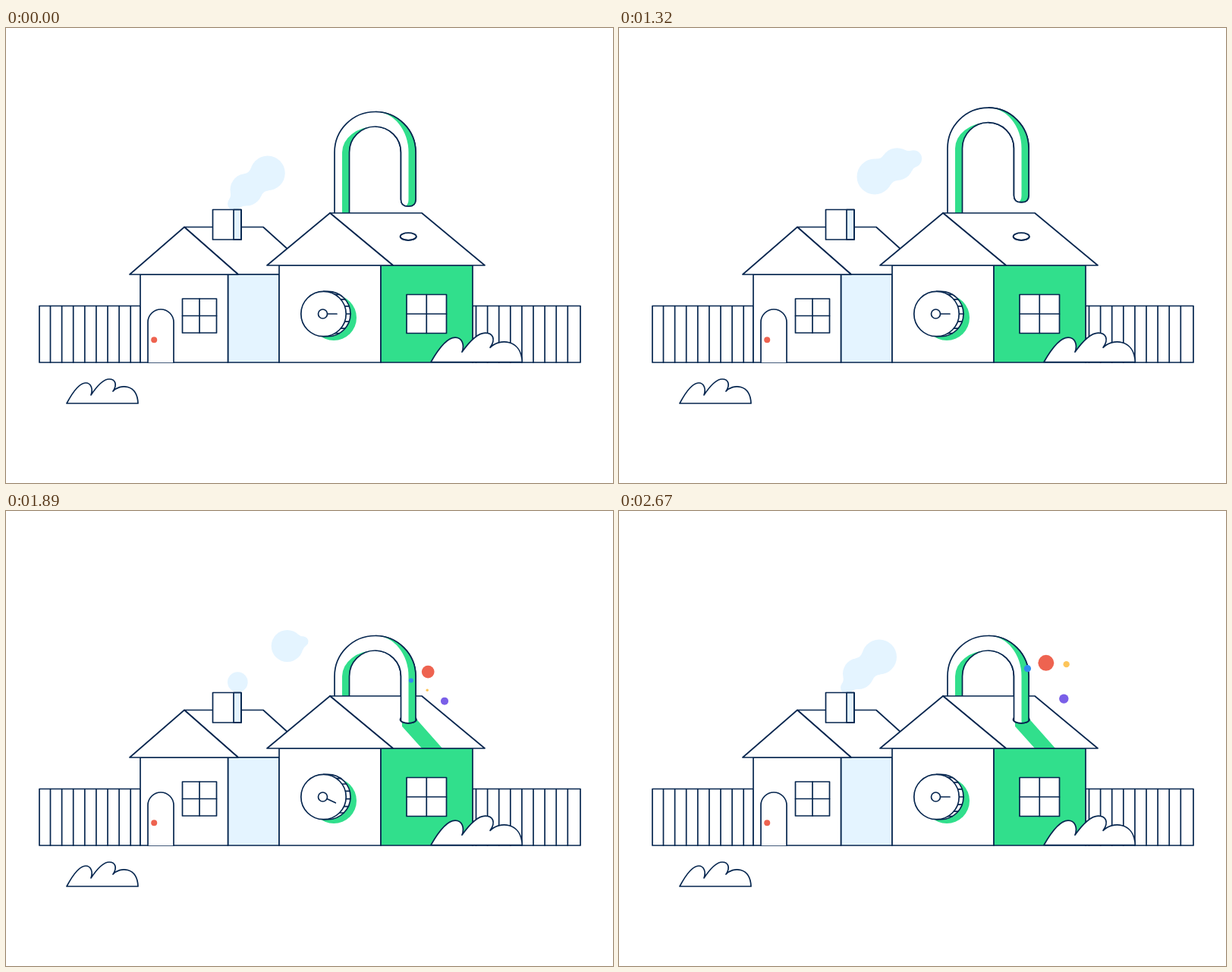
Write an HTML page with a canvas that moves like this. It is 800 by 600 pixels and loops after 2.7 s.

```html
<!DOCTYPE html>
<html lang="en">
<head>
<meta charset="utf-8">
<title>Locked house</title>
<style>
  html, body { margin: 0; width: 100%; height: 100%; overflow: hidden; background: #fff; }
  canvas { display: block; }
</style>
</head>
<body>
<canvas id="stage" width="800" height="600"></canvas>
<script>
const ctx = document.getElementById('stage').getContext('2d');
const LOOP = 2700, STEP = 30, TAU = Math.PI * 2;
const NAVY = '#06264f', GREEN = '#31df8c', PALE = '#e4f4ff', RED = '#ee6350', WHITE = '#fff';

const clamp = v => Math.max(0, Math.min(1, v));
const progress = (t, from, to) => clamp((t - from) / (to - from));
const easeSine = p => (1 - Math.cos(Math.PI * p)) / 2;
const easeCubic = p => p < 0.5 ? 4 * p ** 3 : 1 - 4 * (1 - p) ** 3;
const mix = (a, b, p) => a + (b - a) * p;

function paint(path, fill, stroke = NAVY) {
  if (fill) { ctx.fillStyle = fill; ctx.fill(path); }
  if (stroke) { ctx.strokeStyle = stroke; ctx.stroke(path); }
}
const shape = (d, fill, stroke) => paint(new Path2D(d), fill, stroke);
const box = (x, y, x2, y2, fill, stroke) => shape(`M${x} ${y}H${x2}V${y2}H${x}Z`, fill, stroke);

function disc(x, y, r, fill, stroke = null, ry = r) {
  const path = new Path2D();
  path.ellipse(x, y, Math.max(0, r), Math.max(0, ry), 0, 0, TAU);
  paint(path, fill, stroke);
}

// ---- Smoke: puffs follow one path by age and melt together where they touch ----
const PUFF_BIRTHS = [410, 1650, 2160, 2610];
const PUFF_PATH = [ // age, x, y, radius
  [0, 298, 237, 5], [60, 300, 233, 8], [330, 308, 222, 16], [570, 318, 212, 22],
  [910, 337, 196, 23.5], [1020, 343, 192.5, 23], [1300, 360, 182, 22],
  [1570, 376, 176, 20.5], [1810, 386.5, 172.5, 12.5], [1950, 391, 172, 8.5], [2080, 395, 172, 0]
];

function puffAt(age) {
  const i = PUFF_PATH.findIndex(p => p[0] > age);
  if (i < 1) return null;
  const a = PUFF_PATH[i - 1], b = PUFF_PATH[i], p = progress(age, a[0], b[0]);
  return { x: mix(a[1], b[1], p), y: mix(a[2], b[2], p), r: mix(a[3], b[3], p) };
}

function neck(a, b, f) {
  const dx = b.x - a.x, dy = b.y - a.y, d = Math.hypot(dx, dy);
  if (d <= Math.abs(a.r - b.r) || d > a.r + b.r + 4) return;
  const ra = a.r + f, rb = b.r + f;
  const along = (ra * ra - rb * rb + d * d) / (2 * d);
  const h = Math.sqrt(Math.max(0, ra * ra - along * along));
  if (h <= f) return;
  const ux = dx / d, uy = dy / d;
  const side = s => ({ x: a.x + ux * along - uy * h * s, y: a.y + uy * along + ux * h * s });
  const angle = (from, to) => Math.atan2(to.y - from.y, to.x - from.x);
  const p = side(1), q = side(-1);
  ctx.beginPath();
  ctx.arc(p.x, p.y, f, angle(p, a), angle(p, b), false);
  ctx.arc(q.x, q.y, f, angle(q, b), angle(q, a), false);
  ctx.closePath();
  ctx.fillStyle = PALE;
  ctx.fill();
}

function drawSmoke(t) {
  const puffs = PUFF_BIRTHS
    .map(birth => (t - birth + LOOP) % LOOP)
    .sort((a, b) => a - b)
    .map(puffAt)
    .filter(Boolean);
  puffs.forEach((p, i) => {
    disc(p.x, p.y, p.r, PALE);
    if (i) neck(puffs[i - 1], p, 12);
  });
}

// ---- Scenery ----
function drawFence(left, right, first, count) {
  box(left, 366.5, right, 441, WHITE);
  for (let i = 0; i < count; i++) shape(`M${first + i * 15.1} 366.5V441`);
}

function drawWindow(x, y, x2, y2) {
  box(x, y, x2, y2, WHITE);
  shape(`M${(x + x2) / 2} ${y}V${y2}M${x} ${(y + y2) / 2}H${x2}`);
}

function drawBush(x, y, sx, sy) {
  const outline = new Path2D('M0 0C8-15 17-27 25-27C32-27 35-19 32-11C40-23 49-32 56-32' +
    'C64-32 67-25 61-16C70-26 93-26 94 0Z');
  const placed = new Path2D();
  placed.addPath(outline, new DOMMatrix([sx, 0, 0, sy, x, y]));
  paint(placed, WHITE);
}

function drawSmallHouse() {
  shape('M235 262.5H339L395 313V325H306Z', WHITE);
  box(292.5, 325, 360, 441, PALE);
  box(177, 325, 292.5, 441, WHITE);
  shape('M163 325L235 262.5L306 325Z', WHITE);
  box(272.5, 239.5, 310, 279, WHITE, null);
  box(300, 239.5, 310, 279, PALE);
  box(272.5, 239.5, 310, 279);
  shape('M187 441V388A17 17 0 0 1 221 388V441', WHITE);
  disc(195.2, 411.3, 4, RED);
  drawWindow(232.5, 357, 277.5, 402);
}

function drawDial(turn) {
  const x = 418.5, y = 377, r = 29.7, depth = 5.8, gap = Math.PI / 9;
  disc(432, 382, 30, GREEN);
  shape(`M${x} ${y - r}H${x + depth}A${r} ${r} 0 0 1 ${x + depth} ${y + r}H${x}Z`, WHITE);
  for (let k = -3; k <= 3; k++) {
    const a = k * gap + turn % gap;
    if (Math.abs(a) > 1.1) continue;
    shape(`M${x + r * Math.cos(a)} ${y + r * Math.sin(a)}h${depth}`);
  }
  disc(x, y, r, WHITE, NAVY);
  const hx = 417.5, c = Math.cos(turn), s = Math.sin(turn);
  shape(`M${hx + 6 * c} ${y + 6 * s}L${hx + 18.5 * c} ${y + 18.5 * s}`);
  disc(hx, y, 6, WHITE, NAVY);
}

// ---- Shackle ----
const HOLE = { x: 530.2, y: 275, rx: 10.6, ry: 4.8 };

function drawShackle(drop) {
  ctx.save();
  ctx.translate(0, drop);
  const outline = 'M433 300V164A53.5 53.5 0 0 1 540 164V226Q540 235 531 235H529.5' +
    'Q520.5 235 520.5 226V164A34 34 0 0 0 452.5 164V300';
  shape(outline, WHITE, null);
  shape('M443 300V164A43.5 34 0 0 1 486.5 130A34 34 0 0 0 452.5 164V300Z', GREEN, null);
  shape('M486.5 110.5A53.5 53.5 0 0 1 540 164V226Q540 235 531 235H527Q530.5 232 530.5 226V164' +
    'A44 53.5 0 0 0 486.5 110.5Z', GREEN, null);
  shape(outline);
  ctx.restore();
}

function drawRoofShadow(drop) {
  const away = Math.max(0, 1 - drop / 54);
  ctx.save();
  ctx.clip(new Path2D('M427 244H548L631 313H510Z'));
  ctx.translate(36 * away, 40 * away);
  shape('M522 276V284L557 323H584L541 274.5Z', GREEN, null);
  ctx.restore();
}

function drawRightLeg(drop) {
  ctx.save();
  const { x, y, rx, ry } = HOLE;
  ctx.clip(new Path2D(`M487 0H600V${y}H${x + rx}A${rx} ${ry} 0 0 1 ${x - rx} ${y}H487Z`));
  drawShackle(drop);
  ctx.restore();
  shape(`M${x + rx} ${y}A${rx} ${ry} 0 0 1 ${x - rx} ${y}`);
}

function drawBigHouse(drop, turn) {
  box(360, 313, 494, 441, WHITE);
  box(494, 313, 615, 441, GREEN);
  shape('M427 244H548L631 313H510Z', WHITE, null);
  drawRoofShadow(drop);
  shape('M427 244H548L631 313H510Z');
  shape('M344 313L427 244L510 313Z', WHITE);
  disc(HOLE.x, HOLE.y, HOLE.rx, WHITE, NAVY, HOLE.ry);
  drawRightLeg(drop);
  drawDial(turn);
  drawWindow(528, 351.5, 580.5, 402.5);
}

// ---- Sparks: each one decays from an offset towards its resting place ----
const SPARKS = [
  { color: RED, x: 563, y: 200, r: 10.5, dx: -16, dy: 28.5, dr: -5, ref: 1710, start: 1630 },
  { color: '#7a5fe8', x: 586.5, y: 247.5, r: 6.2, dx: -20, dy: 7.5, dr: -2.7, ref: 1710, start: 1640 },
  { color: '#2f8bf0', x: 538.5, y: 207.3, r: 4.7, dx: -3, dy: 10.5, dr: -1.1, ref: 1980, start: 1770 },
  { color: '#fdc55a', x: 590.5, y: 201.3, r: 4.2, dx: -23, dy: 22.7, dr: -1.6, ref: 1980, start: 1820 }
];

function drawSparks(t) {
  for (const s of SPARKS) {
    if (t <= s.start) continue;
    const k = Math.exp((s.ref - t) / 210);
    disc(s.x + s.dx * k, s.y + s.dy * k, (s.r + s.dr * k) * progress(t, s.start, s.start + 60), s.color);
  }
}

function shackleDrop(t) {
  if (t < 1350) return -5.5 * easeSine(progress(t, 1110, 1350));
  if (t < 1680) return mix(-5.5, 59.5, easeCubic(progress(t, 1350, 1680)));
  return mix(59.5, 54, easeSine(progress(t, 1680, 1890)));
}

function draw(t) {
  const drop = shackleDrop(t);
  const turn = TAU * easeCubic(progress(t, 1726, 2359));
  ctx.fillStyle = WHITE;
  ctx.fillRect(0, 0, 800, 600);
  ctx.lineWidth = 1.7;
  ctx.lineJoin = ctx.lineCap = 'round';

  drawFence(44, 177, 58.5, 8);
  drawFence(615, 757, 619.5, 9);
  drawSmoke(t);
  drawSmallHouse();
  drawShackle(drop);
  drawBigHouse(drop, turn);
  drawBush(80, 495, 1, 1);
  drawBush(560, 440.5, 1.28, 1.2);
  drawSparks(t);
}

function tick() {
  draw(Math.floor(performance.now() % LOOP / STEP) * STEP);
  requestAnimationFrame(tick);
}
tick();
</script>
</body>
</html>
```
